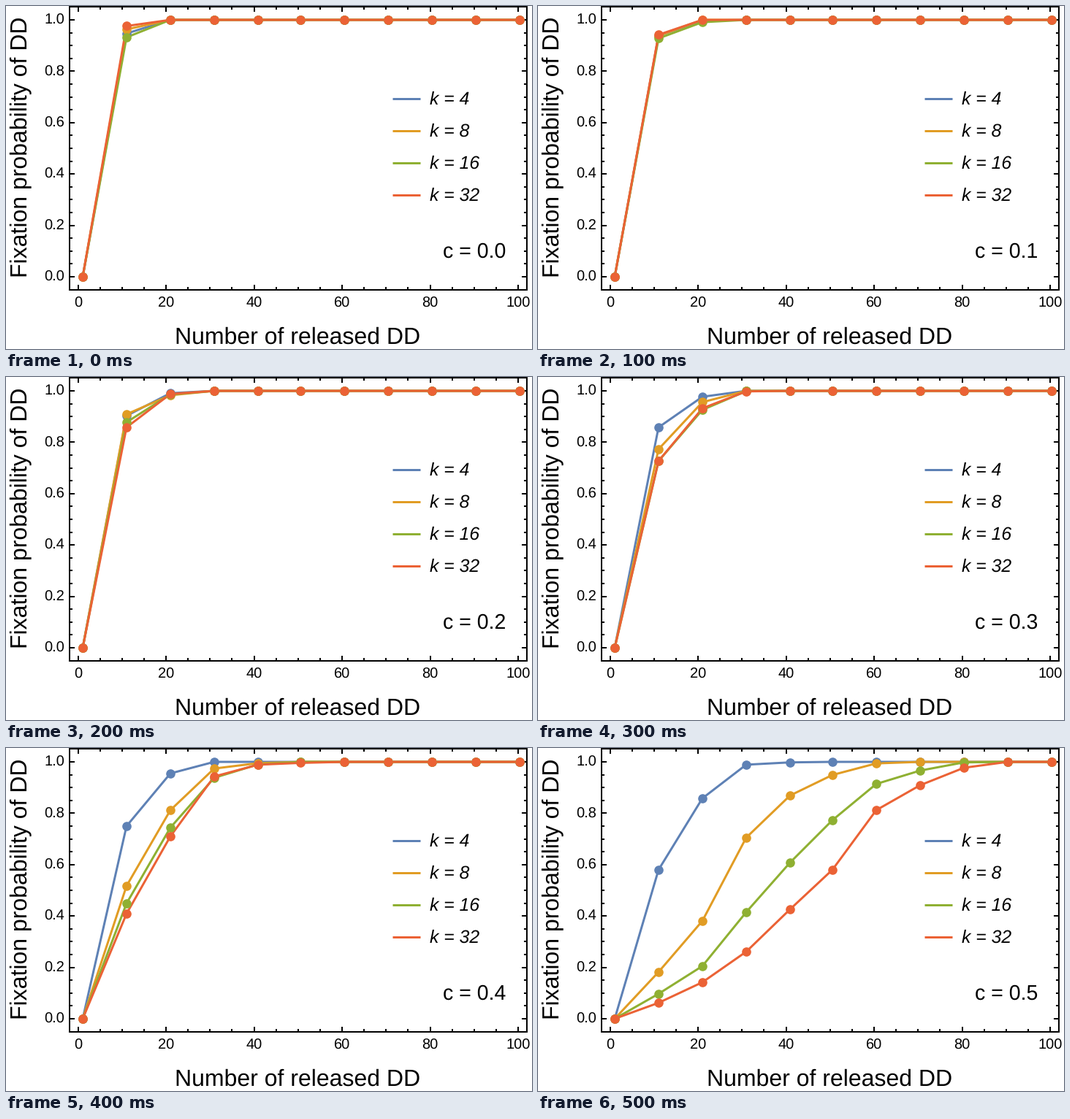
These frames come from a looping animation (720x470 px, 0.6 s). A matplotlib script:

```python
import matplotlib.pyplot as plt
from matplotlib.animation import FuncAnimation
from matplotlib.patches import Rectangle

W, H, DPI = 720, 470, 100
PT = 72 / DPI  # points per pixel
LEFT, RIGHT, TOP, BOTTOM = 87, 713, 1, 389

plt.rcParams["font.family"] = "Liberation Sans"
plt.rcParams["text.hinting"] = "none"

SERIES = {4: "#5E81B5", 8: "#E19C24", 16: "#8FB032", 32: "#EB6235"}

# Per cost c: fixation probabilities of each series from the second point on,
# until they reach 1.
CURVES = [
    [[.947], [.963], [.932], [.976]],
    [[.938, .997], [.938], [.928, .991], [.942]],
    [[.903, .991], [.909, .983], [.878, .986], [.858, .988]],
    [[.858, .977], [.773, .956], [.727, .926, .999], [.727, .932, .998]],
    [[.75, .955], [.517, .812, .974, .995],
     [.449, .744, .938, .99], [.409, .71, .943, .989, .996]],
    [[.58, .858, .989, .998],
     [.182, .381, .705, .869, .949, .994],
     [.097, .205, .415, .608, .773, .914, .966, .998],
     [.062, .142, .261, .426, .58, .812, .909, .977]],
]


def px(x):
    return 98.5 + 6.025 * x


def py(p):
    return 371 - 352 * p


POINTS_X = [105 + 60 * i - (2 if i > 4 else 0) for i in range(11)]

fig = plt.figure(figsize=(W / DPI, H / DPI), dpi=DPI, facecolor="white")
ax = fig.add_axes([0, 0, 1, 1])
ax.set(xlim=(0, W), ylim=(H, 0))
ax.axis("off")


def label(x, y, text, size, **kw):
    return ax.text(x, y, text, fontsize=size * PT, va="baseline", **kw)


def stroke(xs, ys, color="black", width=2, **kw):
    return ax.plot(xs, ys, color=color, lw=width * PT, **kw)[0]


def draw_frame():
    ax.add_patch(Rectangle((LEFT, TOP), RIGHT - LEFT, BOTTOM - TOP,
                           fill=False, lw=2 * PT, zorder=1))
    for i in range(21):
        x, major = px(5 * i), i % 4 == 0
        size = 7 if major else 4
        for edge, sign in ((BOTTOM, -1), (TOP, 1)):
            stroke([x, x], [edge, edge + sign * size], zorder=1,
                   solid_capstyle="butt")
        if major:
            label(x, 413, str(5 * i), 20, ha="center")

        y = py(i / 20)
        for edge, sign in ((LEFT, 1), (RIGHT, -1)):
            stroke([edge, edge + sign * size], [y, y], zorder=1,
                   solid_capstyle="butt")
        if major:
            label(80, y + 6, f"{i / 20:.1f}", 20, ha="right")


def draw_labels():
    label(399.5, 463, "Number of released DD", 32, ha="center")
    ax.text(28, 193.5, "Fixation probability of DD", fontsize=32 * PT,
            rotation=90, rotation_mode="anchor", ha="center", va="baseline")
    for i, (k, color) in enumerate(SERIES.items()):
        y = 127 + 44 * i
        stroke([529, 567], [y, y], color, 3, solid_capstyle="butt")
        label(580, y + 8, f"k = {k}", 24.8, style="italic")


draw_frame()
draw_labels()
cost = label(598, 345, "", 28.5)
lines = [stroke([], [], c, 3, zorder=3, solid_joinstyle="round")
         for c in SERIES.values()]
dots = [stroke([], [], c, 0, zorder=4, ls="none", marker="o",
               ms=12.6 * PT, mew=0) for c in SERIES.values()]


def update(step):
    cost.set_text(f"c = {step / 10:.1f}")
    for line, dot, curve in zip(lines, dots, CURVES[step]):
        probs = [0] + curve + [1] * (10 - len(curve))
        ys = [py(p) for p in probs]
        line.set_data(POINTS_X, ys)
        dot.set_data(POINTS_X, ys)
    return [cost, *lines, *dots]


anim = FuncAnimation(fig, update, frames=len(CURVES), interval=100, repeat=True)
plt.show()
```
